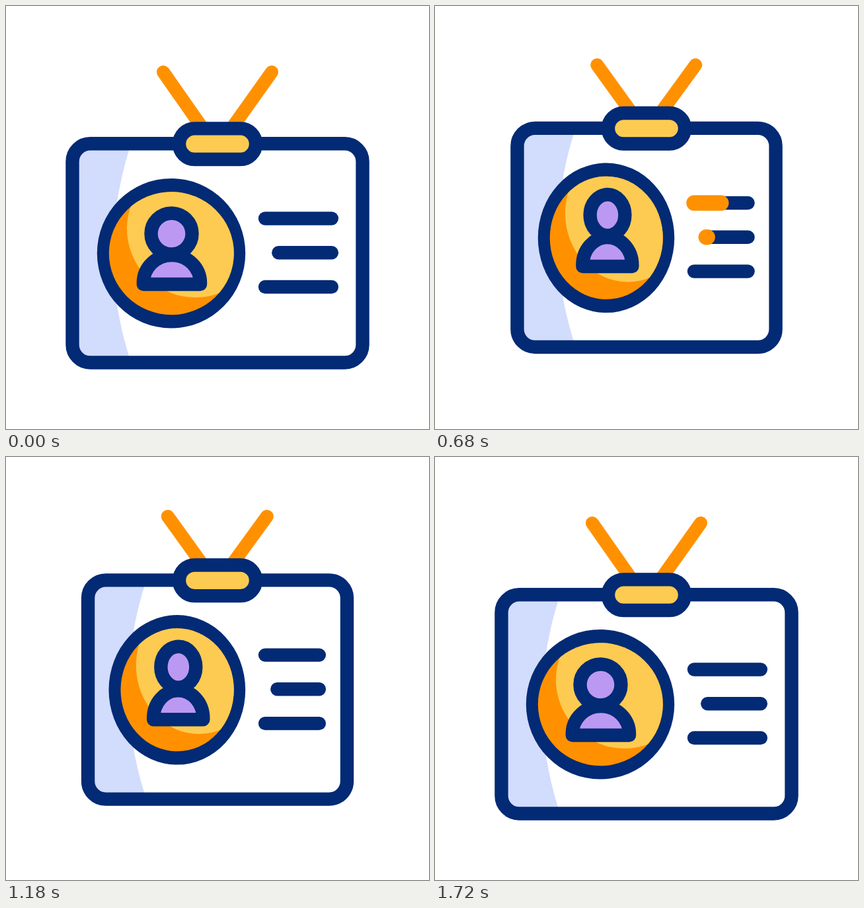
An HTML page for the animation above (1.88 s loop, 640x640 px).

```html
<!DOCTYPE html>
<html lang="en">
<head>
<meta charset="utf-8">
<title>Badge</title>
<style>
  html, body { margin: 0; width: 100%; height: 100%; overflow: hidden; background: #fff; }
  svg { display: block; width: 100vw; height: 100vh; }
  .navy { stroke: #032a74; stroke-width: 20.4; stroke-linecap: round; stroke-linejoin: round; }
  .orange { stroke: #ff9100; stroke-width: 20; stroke-linecap: round; fill: none; }
  .sweep { stroke-width: 23.5; }
</style>
</head>
<body>
<svg viewBox="0 0 640 640">
  <path id="cordL" class="orange"/>
  <path id="cordR" class="orange"/>
  <g id="badge">
    <rect id="paper" y="208.3" height="331.2" rx="27" fill="#fff"/>
    <path id="shade" fill="#d2dcfd"/>
    <rect id="frame" class="navy" y="208.3" height="331.2" rx="27" fill="none"/>
    <rect class="navy" x="262" y="185.4" width="116" height="46.6" rx="23.3" fill="#fdcb51"/>
    <clipPath id="disc"><ellipse id="discClip" cy="374.2" ry="93"/></clipPath>
    <ellipse id="ring" cy="374.2" ry="113.3" fill="#032a74"/>
    <ellipse id="base" cy="374.2" ry="93" fill="#ff9100"/>
    <g clip-path="url(#disc)"><ellipse id="light" cy="337" ry="104" fill="#fdcb51"/></g>
    <ellipse id="head" class="navy" ry="31" fill="#bb99f2"/>
    <path id="body" class="navy" fill="#bb99f2"/>
    <g id="lines"></g>
  </g>
</svg>
<script>
const LOOP = 1880;
const $ = id => document.getElementById(id);

// [time, value] keys, eased in and out
const LIFT = [[310, 0], [471, 17.5], [702, -24.5], [945, 17.5], [1222, -24.5], [1612, 0]];
const SQUEEZE = [[472, 0], [685, 1], [715, 1], [975, 0], [1198, 1], [1415, 1], [1710, 0]];
const HEAD = [[320, 0], [530, 8], [741, -8], [1010, 8], [1248, -8], [1420, -8], [1715, 0]];
const BODY = [[320, 0], [500, 11.5], [700, -4], [980, 11.5], [1240, -4], [1715, 0]];

const ROWS = [[392, 321.5, 0], [412.3, 373.2, -2], [392, 425, 0]];

function ease(p) {
  p = Math.max(0, Math.min(1, p));
  return p * p * (3 - 2 * p);
}

function at(keys, t) {
  let v = keys[0][1];
  for (let i = 1; i < keys.length; i++) {
    const [t0, a] = keys[i - 1], [t1, b] = keys[i];
    if (t >= t0) v = a + (b - a) * ease((t - t0) / (t1 - t0));
  }
  return v;
}

function set(el, attrs) {
  for (const k in attrs) el.setAttribute(k, attrs[k]);
}

function addPath(cls) {
  const el = document.createElementNS('http://www.w3.org/2000/svg', 'path');
  el.setAttribute('class', cls);
  return $('lines').appendChild(el);
}

const rows = ROWS.map(([x, y, dx], i) => ({
  x, y, dx,
  start: 580 + 80 * i,
  bar: addPath('navy'),
  sweep: addPath('orange sweep')
}));

function drawCords(d) {
  const down = d > 0;
  const y = 100 + d * (down ? 0.5 : 0.46);
  const xl = 238 - d * (down ? 0.38 : 0.31);
  const xr = 402 + d * (down ? 0.24 : 0.33);
  set($('cordL'), { d: `M${xl} ${y}L297.5 ${185 + d}` });
  set($('cordR'), { d: `M${xr} ${y + (down ? d * 0.05 : 0)}L341.5 ${185 + d}` });
}

function drawPerson(s, t) {
  set($('head'), { cx: 250.5 + 10.5 * s, cy: 344.5 + at(HEAD, t), rx: 31 - 4.6 * s });
  const l = 207.8 + 15.6 * s, r = 294 + 4.4 * s, y = 419 + at(BODY, t);
  set($('body'), { d: `M${l} ${y + 2}V${y}A${(r - l) / 2} 42 0 0 1 ${r} ${y}V${y + 2}Z` });
}

function drawRow(row, s, t) {
  const x1 = row.x + row.dx * s, x2 = 492.8 - 19.3 * s;
  set(row.bar, { d: `M${x1} ${row.y}H${x2}` });
  const p = t - row.start;
  const head = ease(p / 200), tail = ease((p - 140) / 205);
  const on = head > 0 && tail < 1;
  row.sweep.style.display = on ? '' : 'none';
  if (on) {
    const w = x2 - x1;
    set(row.sweep, { d: `M${x1 + w * tail} ${row.y}H${x1 + w * head + 0.01}` });
  }
}

function draw(t) {
  const d = at(LIFT, t), s = at(SQUEEZE, t);
  drawCords(d);
  set($('badge'), { transform: `translate(0 ${d})` });

  const card = { x: 100.5 + 24 * s, width: 439 - 48 * s };
  set($('paper'), card);
  set($('frame'), card);
  const l = card.x, e = 188 + 23.5 * s;
  set($('shade'), {
    d: `M${l + 27} 212H${e}Q${e - 52} 374 ${e} 536H${l + 27}Q${l} 536 ${l} 512V236Q${l} 212 ${l + 27} 212Z`
  });

  const inner = { cx: 250.3 + 9 * s, rx: 94.5 - 9 * s };
  set($('ring'), { cx: 250 + 9 * s, rx: 112.2 - 9 * s });
  set($('base'), inner);
  set($('discClip'), inner);
  set($('light'), { cx: 287 + 5 * s, rx: 104 - 9 * s });

  drawPerson(s, t);
  rows.forEach(row => drawRow(row, s, t));
}

let begin;
function tick(now) {
  if (begin === undefined) begin = now;
  draw((now - begin) % LOOP);
  requestAnimationFrame(tick);
}
draw(0);
requestAnimationFrame(tick);
</script>
</body>
</html>
```
